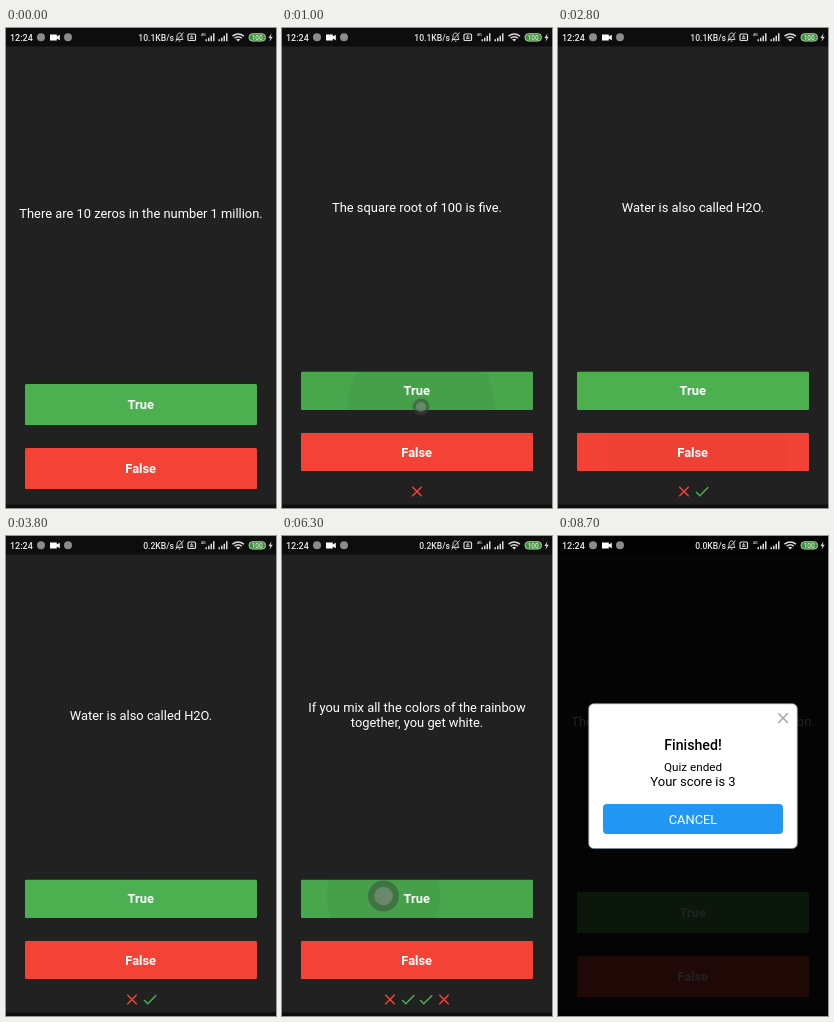
An HTML page for the animation above (8.8 s loop, 270 px wide and 480 px high).

```html
<!DOCTYPE html>
<html lang="en">
<head>
<meta charset="utf-8">
<title>True or false quiz</title>
<style>
  html, body { margin: 0; width: 100%; height: 100%; overflow: hidden; background: #212121; }
  svg { display: block; }
  #stage { width: 270px; height: 480px; }
  text { font-family: Roboto, "Open Sans", sans-serif; font-size: 12.88px; fill: #fff; text-anchor: middle; }
  .label { font-weight: 700; }
  .status text { font-size: 8.6px; font-weight: 500; fill: #e8e8e8; }
  .dialog text { fill: #000; }
</style>
</head>
<body>
<svg id="stage" viewBox="0 0 270 480">
  <defs>
    <path id="wrong" fill="#f44336" transform="translate(-9 -9) scale(.75)"
      d="M19 6.41 17.59 5 12 10.59 6.41 5 5 6.41 10.59 12 5 17.59 6.41 19 12 13.41 17.59 19 19 17.59 13.41 12z"/>
    <path id="right" fill="#4caf50" transform="translate(-9 -9) scale(.75)"
      d="M9 16.17 4.83 12l-1.42 1.41L9 19 21 7l-1.41-1.41z"/>
    <path id="bars" fill="#ddd" d="M0 6h1.5v2H0zM2.5 4.5H4V8H2.5zM5 2.5h1.5V8H5zM7.5 0H9v8H7.5z"/>
  </defs>

  <rect width="270" height="480" fill="#212121"/>
  <text id="line1" x="135"></text>
  <text id="line2" x="135"></text>
  <g id="buttons"></g>
  <g id="marks"></g>
  <rect width="270" height="18.5" fill="#0d0d0d"/>
  <rect y="476.5" width="270" height="3.5" fill="#0d0d0d"/>

  <g id="touch">
    <circle r="1" fill="#3c463c" fill-opacity=".5"/>
    <circle r=".6" fill="#a0a8a0" fill-opacity=".42"/>
  </g>

  <rect id="shade" width="270" height="480" fill="#000" fill-opacity=".87"/>

  <g class="status">
    <text x="4" y="12.8" style="font-size:9px;text-anchor:start">12:24</text>
    <circle cx="35" cy="9.3" r="4" fill="#8b8b8b"/>
    <path fill="#fff" d="M44 6.5h6.8v2l3-1.8v5.6l-3-1.8v2H44z"/>
    <circle cx="62" cy="9.3" r="4" fill="#8b8b8b"/>
    <text id="speed" x="168" y="12.6" style="text-anchor:end"></text>
    <g fill="none" stroke="#ddd">
      <path d="M170 11.5h7l-1-1.5V8c0-4-5-4-5 0v2zM172.5 13h2M169.5 13.5l8-9" stroke-width=".9"/>
      <rect x="182" y="6" width="7.5" height="6.5" rx="1" stroke-width="1.2"/>
      <path d="M184 9h3.5M184 10.6h3.5M185.7 7v2" stroke-width=".9"/>
      <path d="M226.5 8.2q5.7-4.6 11.4 0M228.6 10.2q3.6-2.8 7.2 0" stroke-width="1.5"/>
    </g>
    <path fill="#ddd" d="M230.2 11.4q2-1.4 4 0l-2 2z"/>
    <text x="197.2" y="8" style="font-size:4px">4G</text>
    <use href="#bars" x="199.5" y="5.2"/>
    <use href="#bars" x="212.5" y="5.2"/>
    <rect x="243" y="5.7" width="16.5" height="7.4" rx="3.5" fill="#3f8f3a" stroke="#b9d8b4" stroke-width=".9"/>
    <text x="251.2" y="11.8" style="font-size:6.5px">100</text>
    <path fill="#ddd" d="M265.5 5.2l-3 4.8h1.9l-.9 3.7 3.2-5h-2z"/>
  </g>

  <g id="dialog" class="dialog">
    <rect x="30.7" y="167.7" width="208.6" height="144.8" rx="5" fill="#fff" stroke="#7d8c92" stroke-width=".8"/>
    <path d="M220.3 177.3l9.6 9.6M229.9 177.3l-9.6 9.6" stroke="#aaa" stroke-width="1.5"/>
    <text x="135" y="214" style="font-size:14.15px;font-weight:500">Finished!</text>
    <text x="135" y="235" style="font-size:11.7px">Quiz ended</text>
    <text x="135" y="250" style="font-size:13px">Your score is 3</text>
    <rect x="45" y="268" width="180" height="30" rx="4" fill="#2196f3"/>
    <text x="135" y="287.6" style="fill:#fff">CANCEL</text>
  </g>
</svg>

<script>
const LOOP = 8800, STEP = 100, DONE = 6400;
const $ = id => document.getElementById(id);
const clamp = v => Math.max(0, Math.min(1, v));
const SVG = 'http://www.w3.org/2000/svg';

function make(tag, parent, attrs) {
  const el = parent.appendChild(document.createElementNS(SVG, tag));
  return set(el, attrs);
}
function set(el, attrs) {
  for (const key in attrs) el.setAttribute(key, attrs[key]);
  return el;
}
const show = (el, on) => set(el, { visibility: on ? 'visible' : 'hidden' });

// from: start of the question; x, y: tap position; btn: 0 True, 1 False
const rounds = [
  { from: 0, lines: ['There are 10 zeros in the number 1 million.'], down: 700, x: 139, y: 379, btn: 0, mark: 'wrong' },
  { from: 1000, lines: ['The square root of 100 is five.'], down: 2200, x: 140, y: 425, btn: 1, mark: 'right' },
  { from: 2500, lines: ['Water is also called H2O.'], down: 4100, x: 105, y: 362, btn: 0, mark: 'right' },
  { from: 4300, lines: ['Spiders have six legs.'], down: 4700, x: 100, y: 362, btn: 0, mark: 'wrong' },
  { from: 5000, lines: ['If you mix all the colors of the rainbow', 'together, you get white.'], down: 6100, x: 101.5, y: 360, btn: 0 }
];
rounds.forEach((r, i) => r.up = i < rounds.length - 1 ? rounds[i + 1].from : DONE);

const buttons = [['True', '#4caf50'], ['False', '#f44336']].map(([name, color]) => {
  const box = make('svg', $('buttons'), { x: 19, width: 232, overflow: 'hidden' });
  make('rect', box, { width: '100%', height: '100%', rx: 1.5, fill: color });
  const glow = make('rect', box, { width: '100%', height: '100%', rx: 1.5, fill: '#000' });
  const splash = make('circle', box, { fill: '#000' });
  const label = make('text', box, { x: 115.7, class: 'label' });
  label.textContent = name;
  return { box, glow, splash, label };
});

const marks = rounds.slice(0, -1).map(r => make('use', $('marks'), { href: '#' + r.mark }));

function layout(count) {
  const tops = count ? [343.5, 404.7] : [356, 420];
  const height = count ? 38.5 : 41.3;
  buttons.forEach((b, i) => {
    set(b.box, { y: tops[i], height });
    set(b.label, { y: height / 2 + 4.6 });
  });
  marks.forEach((m, i) => {
    show(m, i < count);
    set(m, { x: 135 + 18 * (i - (count - 1) / 2), y: 463.5 });
  });
  return tops;
}

function ask(lines, count) {
  const base = (count ? 183.8 : 190.2) - (lines.length - 1) * 7.5;
  [$('line1'), $('line2')].forEach((el, i) => {
    el.textContent = lines[i] || '';
    set(el, { y: base + 15 * i });
  });
}

function ripple(t, tops) {
  buttons.forEach((b, i) => {
    const tap = rounds.filter(r => r.btn === i && t >= r.down && t < DONE).pop();
    const age = tap ? t - tap.down : 0;
    const fade = tap ? clamp(1 - (t - tap.up) / 400) : 0;
    const grow = clamp((age + 50) / 450);
    set(b.glow, { 'fill-opacity': .05 * fade * clamp((age + 100) / 200) });
    set(b.splash, {
      cx: tap ? tap.x - 19 : 0, cy: tap ? tap.y - tops[i] : 0,
      r: 15 + 75 * grow, 'fill-opacity': .04 * fade
    });
  });
}

function finger(t) {
  const tap = rounds.find(r => t >= r.down && t <= r.up && t < DONE);
  show($('touch'), tap);
  if (!tap) return;
  const r = t === tap.up ? 8.5 : 15.5;
  set($('touch'), { transform: `translate(${tap.x} ${tap.y}) scale(${r})` });
}

function render(t) {
  const ended = t >= DONE;
  const index = ended ? 0 : rounds.filter(r => t >= r.from).length - 1;
  const tops = layout(index);
  ask(rounds[index].lines, index);
  ripple(t, tops);
  finger(t);
  show($('shade'), ended);
  show($('dialog'), ended);
  $('speed').textContent = (t < 3000 ? '10.1' : t < 7000 ? '0.2' : '0.0') + 'KB/s';
}

const start = performance.now();
function tick() {
  const t = (performance.now() - start) % LOOP;
  render(Math.floor(t / STEP) * STEP);
  requestAnimationFrame(tick);
}
tick();
</script>
</body>
</html>
```
